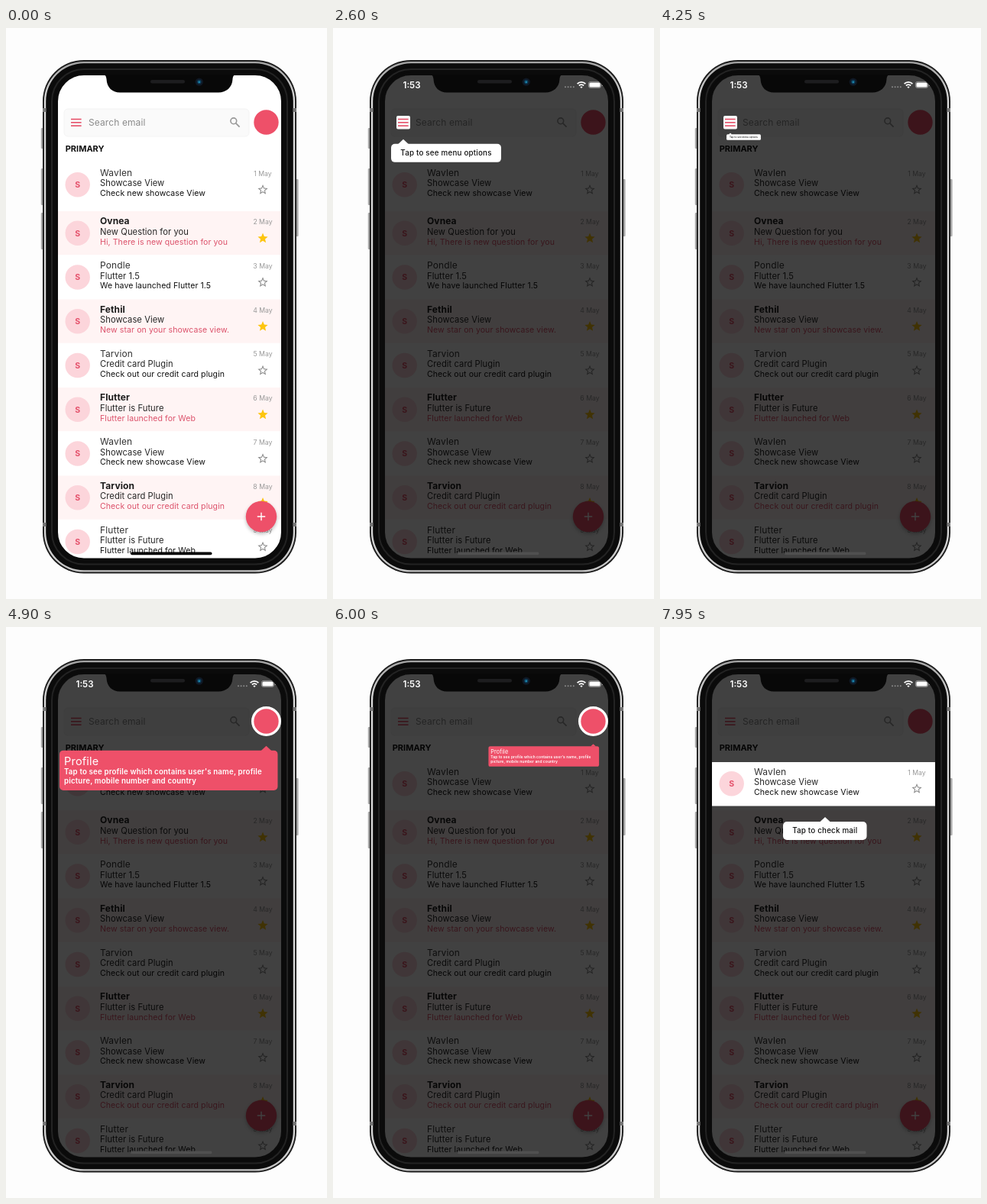
Recreate the animation shown at these times as an HTML page. Size 420 px wide and 748 px high, loop 8 s.

```html
<!DOCTYPE html>
<html lang="en">
<head>
<meta charset="utf-8">
<title>Mail showcase</title>
<style>
  html, body { margin: 0; width: 100%; height: 100%; overflow: hidden; background: #fdfdfd; }
  svg { display: block; width: 100%; height: 100%; font-family: Inter, Roboto, sans-serif; }

  .title { font-size: 12px; letter-spacing: .1px; fill: #333; }
  .subject { font-size: 11.2px; letter-spacing: .06px; fill: #262626; }
  .note { font-size: 10.55px; letter-spacing: .08px; fill: #111; }
  .unread.title { font-weight: 700; fill: #1c1c1c; }
  .unread.note { fill: #dc526b; }
  .date { font-size: 8.7px; fill: #999; text-anchor: middle; }
  .initial { font-size: 10.5px; font-weight: 700; fill: #e4506a; text-anchor: middle; }
  .tip { font-size: 9.8px; font-weight: 500; letter-spacing: .2px; text-anchor: middle; fill: #111; }
  .details { font-size: 9.7px; font-weight: 600; letter-spacing: .17px; fill: #fff; }

  .timed { animation: 8s step-end infinite; }
  #after { animation-name: after; }
  #menuDim { animation-name: menuDim; }
  #profileDim { animation-name: profileDim; }
  #mailDim { animation-name: mailDim; }
  @keyframes after { 0% { opacity: 0 } 15%, 100% { opacity: 1 } }
  @keyframes menuDim { 0% { opacity: 0 } 15% { opacity: 1 } 56.875%, 100% { opacity: 0 } }
  @keyframes profileDim { 0% { opacity: 0 } 56.875% { opacity: 1 } 77.5%, 100% { opacity: 0 } }
  @keyframes mailDim { 0% { opacity: 0 } 77.5%, 100% { opacity: 1 } }

  /* Tooltips grow from their target while drifting down and back. */
  .grow, .drift { animation: 8s linear infinite; }
  #menuTip { transform-origin: 92px 134px; animation-name: menuGrow; }
  #profileTip { transform-origin: 340.5px 145px; animation-name: profileGrow; }
  #mailTip { transform-origin: 216px 236px; animation-name: mailGrow; }
  #menuTip .drift { animation-name: menuDrift; }
  #profileTip .drift { animation-name: profileDrift; }
  #mailTip .drift { animation-name: mailDrift; }
  @keyframes menuGrow {
    0% { transform: scale(0) }
    16.5% { transform: scale(0); animation-timing-function: ease-in }
    20.25% { transform: scale(1) }
    51.25% { transform: scale(1); animation-timing-function: ease-out }
    55%, 100% { transform: scale(0) }
  }
  @keyframes profileGrow {
    0% { transform: scale(0) }
    56.875% { transform: scale(0); animation-timing-function: ease-in }
    60.625% { transform: scale(1) }
    73.75% { transform: scale(1); animation-timing-function: ease-out }
    77.5%, 100% { transform: scale(0) }
  }
  @keyframes mailGrow {
    0% { transform: scale(0) }
    77.5% { transform: scale(0); animation-timing-function: ease-in }
    81.25%, 100% { transform: scale(1) }
  }
  @keyframes menuDrift {
    0% { transform: none }
    16.5% { transform: none; animation-timing-function: ease-in-out }
    41.5% { transform: translateY(4.2px); animation-timing-function: ease-in-out }
    66.5%, 100% { transform: none }
  }
  @keyframes profileDrift {
    0% { transform: none }
    56.875% { transform: none; animation-timing-function: ease-in-out }
    81.875%, 100% { transform: translateY(7px) }
  }
  @keyframes mailDrift {
    0% { transform: none }
    77.5% { transform: none; animation-timing-function: cubic-bezier(.42, 0, .64, 1) }
    100% { transform: translateY(4.2px) }
  }
</style>
</head>
<body>
<script>
const pink = '#ee5069';
const mails = [
  ['Wavlen', 'Showcase View', 'Check new showcase View'],
  ['Ovnea', 'New Question for you', 'Hi, There is new question for you'],
  ['Pondle', 'Flutter 1.5', 'We have launched Flutter 1.5'],
  ['Fethil', 'Showcase View', 'New star on your showcase view.'],
  ['Tarvion', 'Credit card Plugin', 'Check out our credit card plugin'],
  ['Flutter', 'Flutter is Future', 'Flutter launched for Web'],
  ['Wavlen', 'Showcase View', 'Check new showcase View'],
  ['Tarvion', 'Credit card Plugin', 'Check out our credit card plugin'],
  ['Flutter', 'Flutter is Future', 'Flutter launched for Web']
];

const rect = (x, y, w, h, r, fill, extra = '') =>
  `<rect x="${x}" y="${y}" width="${w}" height="${h}" rx="${r}" fill="${fill}" ${extra}/>`;
const circle = (x, y, r, fill, extra = '') =>
  `<circle cx="${x}" cy="${y}" r="${r}" fill="${fill}" ${extra}/>`;
const text = (x, y, cls, str) => `<text x="${x}" y="${y}" class="${cls}">${str}</text>`;

const starOuter = 'M12 17.27L18.18 21l-1.64-7.03L22 9.24l-7.19-.61L12 2 9.19 8.63 2 9.24l5.46 4.73L5.82 21z';
const starInner = 'M12 15.4l-3.76 2.27 1-4.28-3.32-2.88 4.38-.38L12 6.1l1.71 4.04 4.38.38-3.32 2.88 1 4.28z';
const star = (y, filled) =>
  `<path transform="translate(328.1 ${y - 7.7}) scale(.66)" fill-rule="evenodd"
    fill="${filled ? '#fdc50f' : '#8c8c8c'}" d="${starOuter}${filled ? '' : starInner}"/>`;

function mailRow([sender, subject, note], i) {
  const y = i ? 240 + 57.75 * (i - 1) : 176.5;
  const unread = i % 2 ? ' unread' : '';
  return (unread ? rect(60, y, 308, 57.2, 0, '#fff4f4') : '')
    + circle(93.7, y + 28.8, 16.2, '#fcd5db')
    + text(93.7, y + 32.7, 'initial', 'S')
    + text(123, y + 17.4, 'title' + unread, sender)
    + text(123, y + 30.8, 'subject', subject)
    + text(123, y + 43.6, 'note' + unread, note)
    + text(336, y + 17.2, 'date', `${i + 1} May`)
    + star(y + 35, unread);
}

const app = rect(60, 54, 308, 650, 0, '#fff')
  + rect(76, 106, 242, 36, 5, '#fafafa', 'stroke="#f3f3f3" stroke-width="1"')
  + [119.5, 123.8, 128.1].map(y => rect(85, y - .8, 13.6, 1.6, 0, '#e64f69')).join('')
  + '<text x="108" y="128" font-size="12" letter-spacing=".1" fill="#8b8b8b">Search email</text>'
  + '<g fill="none" stroke="#999" stroke-width="1.6"><circle cx="297.8" cy="121.8" r="3.9"/><path d="M300.6 124.6l5 5"/></g>'
  + circle(340.5, 123.5, 16.2, pink)
  + '<text x="77.7" y="162" font-size="11" font-weight="700" fill="#111">PRIMARY</text>'
  + mails.map(mailRow).join('')
  + circle(334, 642.5, 20, '#000', 'opacity=".28" filter="url(#shadow)"')
  + circle(334, 640, 20.2, pink)
  + '<path d="M328.8 640h10.4M334 634.8v10.4" stroke="#fff" stroke-width="1.4"/>';

const homeBar = fill => rect(163, 686.6, 106.5, 3.6, 1.8, fill);

// A blurred, darkened copy of the app with the showcased target left open.
const dim = (id, hole) => `<clipPath id="${id}Hole"><path clip-rule="evenodd" d="M60 54H368V704H60Z${hole}"/></clipPath>
  <g id="${id}" class="timed"><g clip-path="url(#${id}Hole)">
    <use href="#app" filter="url(#blur)"/>${rect(60, 54, 308, 650, 0, '#000', 'opacity=".745"')}</g></g>`;
const dims = dim('menuDim', 'M85 115H99a2 2 0 0 1 2 2V130.6a2 2 0 0 1-2 2H85a2 2 0 0 1-2-2V117a2 2 0 0 1 2-2Z')
  + dim('profileDim', 'M321 123.5a19.5 19.5 0 0 1 39 0a19.5 19.5 0 0 1-39 0Z')
  + dim('mailDim', 'M60 177H368V234.5H60Z');

const tooltip = (id, tipX, [x, y, w, h], fill, content) =>
  `<g id="${id}" class="grow"><g class="drift">
    <path d="M${tipX - 7} ${y + .5}l7-6.5 7 6.5z" fill="${fill}"/>
    ${rect(x, y, w, h, 5, fill)}${content}</g></g>`;
const tooltips =
  tooltip('menuTip', 92, [76, 148.8, 144, 24], '#fff', text(148, 164, 'tip', 'Tap to see menu options'))
  + tooltip('profileTip', 340.5, [70, 161.2, 285.5, 52.4], pink,
      '<text x="76" y="180.2" font-size="14.5" letter-spacing=".2" fill="#fff">Profile</text>'
      + text(76, 192.7, 'details', "Tap to see profile which contains user's name, profile")
      + text(76, 204.7, 'details', 'picture, mobile number and country'))
  + tooltip('mailTip', 216, [161, 250.8, 109.5, 24], '#fff', text(215.8, 266, 'tip', 'Tap to check mail'));

const statusBar = '<text x="91.5" y="78.6" font-size="11.6" font-weight="600" fill="#fff">1:53</text>'
  + [304, 307.6, 311.2, 314.8].map(x => circle(x, 77.3, 1, '#fff', 'opacity=".4"')).join('')
  + `<g fill="none" stroke="#fff" stroke-width="1.8">
      <path d="M319.6 73.1a7.6 7.6 0 0 1 10.8 0M321.9 75.5a4.4 4.4 0 0 1 6.2 0"/></g>
    <path d="M325 79l-1.6-1.7a2.3 2.3 0 0 1 3.2 0z" fill="#fff"/>`
  + rect(334.4, 70.4, 16.2, 8, 2.4, 'none', 'stroke="#fff" stroke-opacity=".5" stroke-width=".8"')
  + rect(335.4, 71.4, 14.2, 6, 1.5, '#fff')
  + rect(351.8, 73, 1.2, 3, .6, '#fff', 'opacity=".6"');

const shell = (inset, fill, extra) =>
  rect(48 + inset, 42 + inset, 332 - 2 * inset, 672.5 - 2 * inset, 54 - inset, fill, extra);
const phone = [[45.8, 131, 27], [45.8, 184, 48], [45.8, 242, 48], [379, 198, 75]]
    .map(([x, y, h]) => rect(x, y, 3.5, h, 1, '#a6a6a6')).join('')
  + shell(0, '#1c1c1c') + shell(1.9, 'url(#metal)') + shell(4.2, '#0b0b0b')
  + shell(12, 'none', 'stroke="#232323" stroke-width="2"')
  + [[48, 105], [375.5, 105], [48, 648], [375.5, 648]].map(([x, y]) => rect(x, y, 4.5, 5, 0, '#777')).join('');
const bezel = shell(18, 'none', 'stroke="#0b0b0b" stroke-width="4"');

const notch = `<path d="M126 61C130 61 131 63 131.5 67C132 78 139 84.5 149 84.5H278
    C288 84.5 296 78 296.5 67C297 63 298 61 302 61Z" fill="#080808"/>`
  + rect(189, 68, 45, 4.6, 2.3, '#1d1d1f')
  + circle(252.8, 70.6, 5.2, '#101824') + circle(252.8, 70.6, 2.8, '#0c3a55') + circle(252.8, 70.8, 1.4, '#1f86ac');

document.body.innerHTML = `<svg viewBox="0 0 420 748">
  <defs>
    <clipPath id="screen">${rect(67, 61, 294, 634.5, 36, '#000')}</clipPath>
    <filter id="shadow" x="-30%" y="-30%" width="160%" height="160%"><feGaussianBlur stdDeviation="2.5"/></filter>
    <filter id="blur" color-interpolation-filters="sRGB"><feGaussianBlur stdDeviation=".6"/></filter>
    <linearGradient id="metal" x2="0" y2="1">
      <stop offset="0" stop-color="#a5a5a5"/><stop offset=".08" stop-color="#dcdcdc"/>
      <stop offset=".92" stop-color="#d8d8d8"/><stop offset="1" stop-color="#c4c4c4"/>
    </linearGradient>
  </defs>
  ${phone}
  <g clip-path="url(#screen)">
    <g id="app">${app}</g>
    ${homeBar('#000')}
    ${dims}
    <g id="after" class="timed">${homeBar('#505050')}${statusBar}</g>
    ${tooltips}
  </g>
  ${bezel}${notch}
</svg>`;
</script>
</body>
</html>
```
